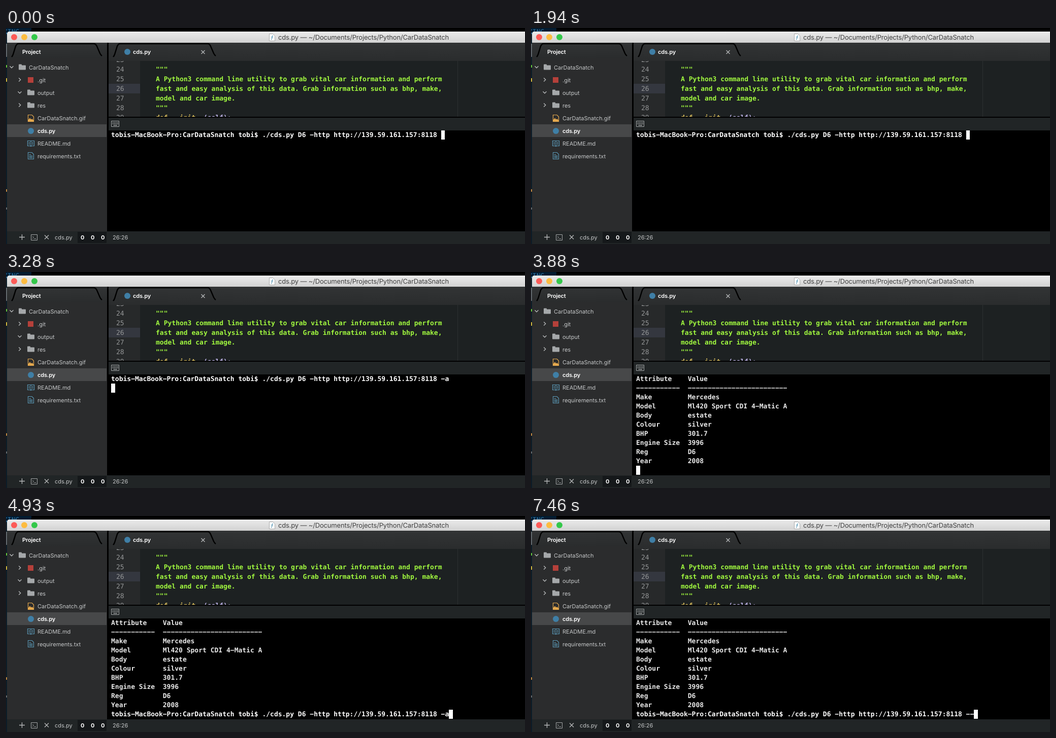
Write an HTML page that moves like this. It is 1022 by 426 pixels and loops after 8 s.

```html
<!DOCTYPE html>
<html lang="en">
<head>
<meta charset="utf-8">
<title>Terminal session</title>
<style>
  html, body { margin: 0; width: 100%; height: 100%; overflow: hidden; background: #000; }
  svg { display: block; width: 1022px; height: 426px; }
  text { white-space: pre; text-rendering: geometricPrecision; }
  .ui { font: 11px Inter, "Open Sans", sans-serif; fill: #c6c8c9; }
  .strong { font-weight: 600; letter-spacing: -.15px; fill: #fff; }
  .title { font: 13px Inter, "Open Sans", sans-serif; letter-spacing: -.17px; fill: #404040; }
  .mono { font: bold 13px "DejaVu Sans Mono", "Noto Sans Mono", monospace; }
  .code { fill: #a1f93f; }
  .num { font-weight: normal; fill: #949697; }
  .out { fill: #e9e9e9; }
  .prompt { fill: #fff; }
  .line { fill: none; stroke: #b9bbbc; stroke-width: 1.3; }
  .edge { fill: none; stroke: #000; stroke-width: 2.4; }
  .blue { fill: none; stroke: #5b9ab8; stroke-width: 1.1; }
  #cursor { fill: #fff; shape-rendering: crispEdges; }
</style>
</head>
<body>
<svg viewBox="0 0 1022 426">
  <defs>
    <linearGradient id="bar" x2="0" y2="1">
      <stop stop-color="#ebebeb"/><stop offset="1" stop-color="#d2d2d2"/>
    </linearGradient>
    <linearGradient id="strip" x2="0" y2="1">
      <stop stop-color="#323435"/><stop offset="1" stop-color="#2a2c2d"/>
    </linearGradient>
    <path id="folder" d="M0 1.5Q0 .5 1 .5H5Q6 .5 6 1.5V2.5H13Q14 2.5 14 3.5V10.5Q14 11.5 13 11.5H1Q0 11.5 0 10.5Z" fill="#a5a8aa"/>
    <path id="right" class="line" d="M-1.8-3.5L1.8 0L-1.8 3.5"/>
    <path id="down" class="line" d="M-3.5-1.8L0 1.8L3.5-1.8"/>
    <clipPath id="editor"><path d="M202 65H1022V175H202Z"/></clipPath>
  </defs>

  <!-- desktop behind the window -->
  <path fill="#021b30" d="M0 0H50V12H0Z"/>
  <path fill="#0b1c28" d="M0 12H2V426H0Z"/>
  <g clip-path="url(#editor-none)">
    <text class="mono" x="-5" y="12" fill="#2f78a8" style="font-weight:normal">KING</text>
  </g>
  <path fill="#5fc23a" d="M0 73H2V78H0Z"/>
  <path fill="#c9b23c" d="M0 99H2V106H0Z"/>
  <path fill="#b98440" d="M0 318H2V323H0Z"/>
  <path fill="#9a9a9a" d="M0 31H2V57H0ZM0 354H2V358H0Z" opacity=".6"/>

  <!-- title bar -->
  <path fill="url(#bar)" d="M2 29V12Q2 7 7 7H1022V29Z"/>
  <circle cx="16" cy="18" r="6" fill="#fc5b57"/>
  <circle cx="36" cy="18" r="6" fill="#fdbc40"/>
  <circle cx="56" cy="18" r="6" fill="#34c84a"/>
  <path d="M518.5 11.5H525.5L529.5 15.5V25.5H518.5Z" fill="#fff" stroke="#a9a9a9"/>
  <path class="blue" d="M522 23Q524 22 524 18Q524 15 526 15M522 18H526"/>
  <text class="title" x="536" y="23">cds.py — ~/Documents/Projects/Python/CarDataSnatch</text>

  <!-- sidebar -->
  <path fill="#2b2c2d" d="M2 29H199V401H2Z"/>
  <path fill="url(#strip)" d="M2 29H199V60H2Z"/>
  <path class="edge" d="M11 57Q13 55 14 52L19 36Q21 31 25 31H172Q177 31 179 36L185 50Q187 54 189 55"/>
  <text class="ui strong" x="32" y="51">Project</text>
  <path fill="#474849" d="M2 190H198V215H2Z"/>
  <use href="#down" x="11" y="77"/>
  <use href="#right" x="27" y="102"/>
  <use href="#down" x="27" y="127"/>
  <use href="#right" x="27" y="152"/>
  <use href="#folder" x="25" y="71"/>
  <use href="#folder" x="42" y="121"/>
  <use href="#folder" x="42" y="146"/>
  <path fill="#b5403a" d="M43 97H54V108H43Z"/>
  <path d="M43.5 171.5H51L54.5 175V184.5H43.5Z" fill="none" stroke="#e5a94e" stroke-width="1.2"/>
  <path d="M44 184V181L47 177.5L49.5 180.5L51.5 179L54 182V184Z" fill="#e5a94e"/>
  <circle cx="49" cy="203" r="6" fill="#3f7fa6"/>
  <path class="blue" d="M42.5 222.5H48L49 223.5L50 222.5H55.5V232.5H50L49 233.5L48 232.5H42.5ZM49 224V233M44.5 225.5H47M44.5 227.5H47M44.5 229.5H47M51 225.5H53.5M51 227.5H53.5M51 229.5H53.5"/>
  <path class="blue" d="M43.5 245.5H51L54.5 249V258.5H43.5ZM45.5 249.5H49M45.5 252H52.5M45.5 254H52.5M45.5 256H52.5"/>
  <g id="tree" class="ui"></g>
  <path d="M199 29H202V401H199Z"/>

  <!-- editor -->
  <path fill="url(#strip)" d="M202 29H1022V65H202Z"/>
  <path class="edge" d="M211 57Q213 55 214 52L219 36Q221 31 225 31H397Q401 31 403 36L409 50Q411 54 413 55"/>
  <circle cx="239" cy="47" r="6" fill="#3f7fa6"/>
  <text class="ui strong" x="250" y="51">cds.py</text>
  <path class="line" d="M384.5 44L391.5 51M391.5 44L384.5 51"/>
  <path fill="#1d2122" d="M264 65H1022V176H264Z"/>
  <path fill="#27292a" d="M202 65H264V176H202Z"/>
  <path fill="#34373f" d="M202 110H264V129H202Z"/>
  <path fill="#2b2f30" d="M889 65H890V176H889Z"/>
  <g id="code" class="mono" clip-path="url(#editor)"></g>

  <!-- terminal panel -->
  <path d="M202 175H1022V401H202Z"/>
  <path fill="#212526" d="M202 177H1022V202H202Z"/>
  <path d="M207.5 183.5H222.5V194.5H207.5Z" fill="none" stroke="#a5a8a9"/>
  <path d="M209.5 186.5H221M209.5 189H221" stroke="#a5a8a9" stroke-width="1.4" stroke-dasharray="1.5 1"/>
  <path d="M211.5 192H219" stroke="#a5a8a9" stroke-width="1.4"/>
  <g id="table" class="mono out"></g>
  <text id="prompt" class="mono prompt" x="207"></text>
  <rect id="cursor" height="18"/>

  <!-- status bar -->
  <path fill="#212526" d="M2 401H1022V426H2Z"/>
  <path fill="#15181a" d="M141 402H198V424H141Z"/>
  <path class="line" d="M26 412.5H37M31.5 407V418M76 408.5L84 416.5M84 408.5L76 416.5"/>
  <path d="M49.5 407.5H61.5V418.5H49.5ZM52 410.5L54.5 413L52 415.5M55.5 415.5H59" fill="none" stroke="#a5a8a9"/>
  <g class="ui">
    <text x="96" y="417">cds.py</text>
    <text x="210" y="417">26:26</text>
    <g font-weight="700" fill="#fff">
      <text x="147" y="417">0</text><text x="167" y="417">0</text><text x="187" y="417">0</text>
    </g>
  </g>
</svg>
<script>
  const $ = id => document.getElementById(id);
  const CELL = 7.8267, ROW = 18, LEFT = 207, TOP = 202, LOOP = 8000;

  // The terminal face draws its hyphen as wide as a minus sign.
  const wide = s => s.replace(/-/g, "\u2212");

  function label(parent, x, y, str, cls = "") {
    const el = document.createElementNS("http://www.w3.org/2000/svg", "text");
    el.setAttribute("x", x);
    el.setAttribute("y", y);
    el.setAttribute("class", cls);
    el.textContent = str;
    $(parent).append(el);
    return el;
  }

  ["CarDataSnatch", ".git", "output", "res", "CarDataSnatch.gif", "cds.py", "README.md", "requirements.txt"]
    .forEach((name, i) => label("tree", i ? 62 : 45, 82 + 25 * i, name, name === "cds.py" ? "strong" : ""));

  ["", '"""',
    "A Python3 command line utility to grab vital car information and perform",
    "fast and easy analysis of this data. Grab information such as bhp, make,",
    "model and car image.", '"""'
  ].forEach((str, i) => {
    const y = 67 + 19 * i;
    label("code", 217, y, 23 + i, "num");
    label("code", 295, y, str, "code");
  });
  label("code", 217, 181, 29, "num");
  label("code", 295, 181, "def __init__").setAttribute("fill", "#e2c562");
  label("code", 295 + 12 * CELL, 181, "(self):").setAttribute("fill", "#c3b8ee");

  const table = [
    ["Attribute", "Value"],
    ["-".repeat(11), "-".repeat(25)],
    ["Make", "Mercedes"],
    ["Model", "Ml420 Sport CDI 4-Matic A"],
    ["Body", "estate"],
    ["Colour", "silver"],
    ["BHP", "301.7"],
    ["Engine Size", "3996"],
    ["Reg", "D6"],
    ["Year", "2008"]
  ];
  table.forEach(([key, value], i) =>
    label("table", LEFT, TOP + 13 + ROW * i, wide(key.padEnd(13) + value)));

  const ps1 = "tobis-MacBook-Pro:CarDataSnatch tobi$ ";
  const cmd = ps1 + "./cds.py D6 -http http://139.59.161.157:8118 ";
  const last = table.length;

  // start time, prompt row, line, cursor shown
  const steps = [
    [0, 0, cmd, true],
    [450, 0, cmd, false],
    [890, 0, cmd, true],
    [1490, 0, cmd, false],
    [1940, 0, cmd, true],
    [2080, 0, cmd + "-", true],
    [2230, 0, cmd + "-a", true],
    [3280, 0, cmd + "-a\n", true],
    [3880, last, "", true],
    [4030, last, ps1, true],
    [4930, last, cmd + "-a", true],
    [5820, last, cmd + "-a", false],
    [6270, last, cmd + "-a ", true],
    [6720, last, cmd + "-a", true],
    [6870, last, cmd + "-", true],
    [7460, last, cmd + "--", true]
  ];

  let shown;
  function draw() {
    const t = performance.now() % LOOP;
    const step = steps.filter(s => s[0] <= t).pop();
    if (step !== shown) show(shown = step);
    requestAnimationFrame(draw);
  }

  function show([, row, line, cursorOn]) {
    const entered = line.endsWith("\n");
    const col = entered ? 0 : line.length;
    const x = Math.round(LEFT + col * CELL);
    $("table").style.display = row ? "" : "none";
    $("prompt").textContent = wide(line.trimEnd());
    $("prompt").setAttribute("y", TOP + 13 + ROW * row);
    $("cursor").setAttribute("x", x);
    $("cursor").setAttribute("y", TOP + ROW * (row + entered));
    $("cursor").setAttribute("width", Math.round(LEFT + (col + 1) * CELL) - x);
    $("cursor").style.display = cursorOn ? "" : "none";
  }

  draw();
</script>
</body>
</html>
```
